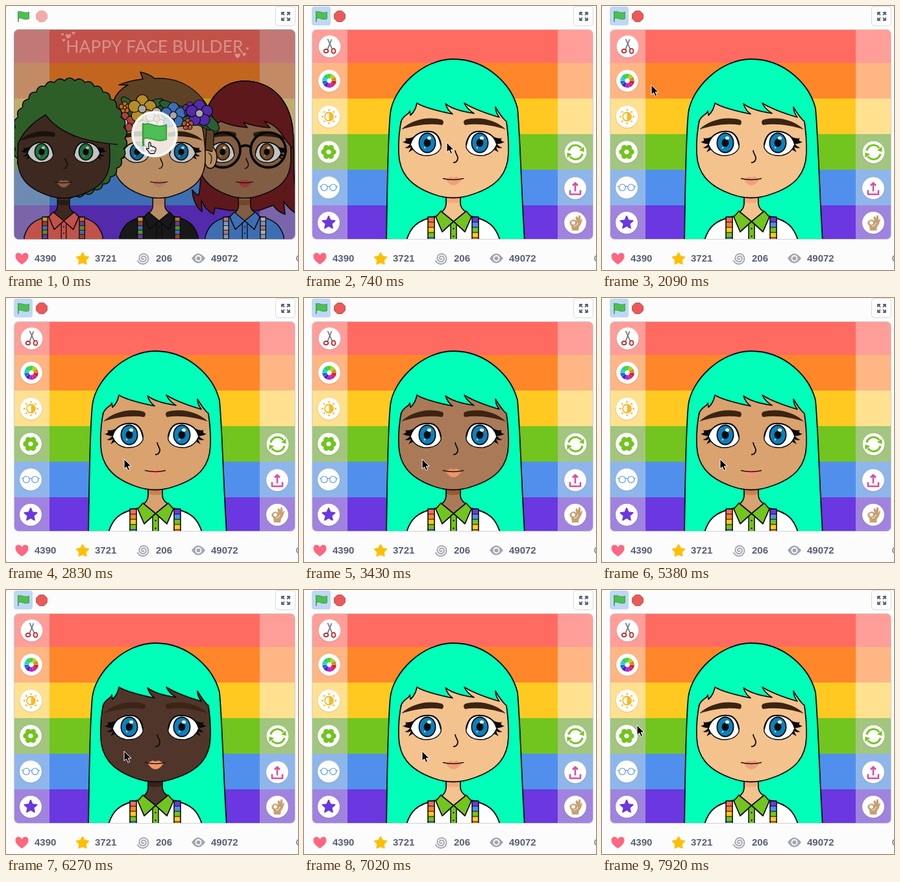
An HTML page with a canvas for the animation above (8 s loop, 450 by 408 pixels).

```html
<!DOCTYPE html>
<html lang="en">
<head>
<meta charset="utf-8">
<title>Face builder</title>
<style>
html, body { margin: 0; width: 100%; height: 100%; overflow: hidden; background: #fcfcfc; }
canvas { display: block; }
</style>
</head>
<body>
<canvas id="view" width="450" height="408"></canvas>
<script>
const ctx = document.getElementById('view').getContext('2d');
const LOOP = 8000, START = 740, TAU = Math.PI * 2;
const INK = '#0b0b0b', GREY = '#575e75', MINT = '#00ffb8';
const RED = '#ff6b60', ORANGE = '#ff8629', YELLOW = '#ffc922';
const GREEN = '#72c41f', BLUE = '#5090ec', PURPLE = '#6b37e0';
const RAINBOW = [RED, ORANGE, YELLOW, GREEN, BLUE, PURPLE];
const PALE = ['#ff9e99', '#ffb685', '#ffe190', '#a2c67d', '#8fb6ea', '#a083df'];
const EDGES = [37, 88, 143, 198, 253, 308, 361];

const SKINS = {
  tan: { skin: '#f4c28d', shade: '#f5a978', lip: '#efa07b' },
  mid: { skin: '#d9a26f', shade: '#cc8050', lip: '#ee9871' },
  brown: { skin: '#aa7a58', shade: '#9c5833', lip: '#f19468' },
  dark: { skin: '#50362a', shade: '#382118', lip: '#f0956b' },
  light: { skin: '#fadfc3', shade: '#fccda5', lip: '#e9936e' }
};
const SKIN_STEPS = [
  [0, 'tan'], [2830, 'mid'], [3430, 'brown'], [4180, 'dark'], [4630, 'light'],
  [5080, 'tan'], [5380, 'mid'], [5970, 'brown'], [6270, 'dark'], [6720, 'light'], [7020, 'tan']
];
const POINTER = [
  [590, 220, 211], [1340, 217, 198], [1490, 202, 126], [2090, 76, 122],
  [2240, 47, 108], [2390, 38, 107], [2540, 147, 191], [2680, 187, 239],
  [2830, 182, 249], [7770, 61, 176], [7920, 54, 209]
];

const stepAt = (steps, t) => steps.filter(s => s[0] <= t).pop();

function shape(d, fill, width, stroke = INK) {
  const p = typeof d === 'string' ? new Path2D(d) : d;
  if (fill) { ctx.fillStyle = fill; ctx.fill(p); }
  if (width) { ctx.lineWidth = width; ctx.strokeStyle = stroke; ctx.stroke(p); }
}
function oval(x, y, rx, ry, fill, width, stroke) {
  const p = new Path2D();
  p.ellipse(x, y, rx, ry, 0, 0, TAU);
  shape(p, fill, width, stroke);
}
const disc = (x, y, r, fill, width, stroke) => oval(x, y, r, r, fill, width, stroke);
function box(x, y, w, h, r, fill, width, stroke) {
  const p = new Path2D();
  p.roundRect(x, y, w, h, r);
  shape(p, fill, width, stroke);
}
function arc(x, y, r, a, b, width, color) {
  const p = new Path2D();
  p.arc(x, y, r, a, b);
  shape(p, null, width, color);
}
function at(x, y, s, draw) {
  ctx.save();
  ctx.translate(x, y);
  ctx.scale(s, s);
  draw();
  ctx.restore();
}
function star(x, y, r, inner, fill) {
  const p = new Path2D();
  for (let i = 0; i < 10; i++) {
    const a = i * TAU / 10 - TAU / 4, k = i % 2 ? inner : r;
    p.lineTo(x + k * Math.cos(a), y + k * Math.sin(a));
  }
  p.closePath();
  shape(p, fill, 2, fill);
}
function heart(x, y, s, fill) {
  at(x, y, s, () => shape('M0 9 C-4 6 -10 2 -10 -4 C-10 -10 -2 -11 0 -5 C2 -11 10 -10 10 -4 C10 2 4 6 0 9 Z', fill));
}
function flower(x, y, r, fill, center) {
  for (let i = 0; i < 5; i++) {
    const a = i * TAU / 5 - TAU / 4;
    disc(x + r * .58 * Math.cos(a), y + r * .58 * Math.sin(a), r * .42, fill, 1.2);
  }
  disc(x, y, r * .28, center, 1.2);
}
function flag(x, y, s) {
  at(x, y, s, () => {
    shape('M0 0 V17', null, 1.6, '#45993d');
    shape('M0 1.2 C5 -1.5 9 4.5 17 1.2 V12 C9 15 5 9 0 11.8 Z', '#4cbf56', .9, '#45993d');
  });
}

// The bust is laid out around x = 230.5; mirrored parts use this axis.
function bothSides(draw) {
  draw();
  ctx.save();
  ctx.translate(461, 0);
  ctx.scale(-1, 1);
  draw();
  ctx.restore();
}

function braces(x, colors) {
  colors.forEach((c, i) => {
    ctx.fillStyle = c;
    ctx.fillRect(x, 326 + i * 8, 10, 8);
    shape(`M${x} ${326 + i * 8} h10`, null, 1);
  });
  ctx.lineWidth = 1.6;
  ctx.strokeRect(x, 326, 10, 70);
}

function body(o) {
  shape('M158 362 C164 342 174 331 203 325 L230 333 L258 325 C286 331 296 342 302 362 V390 H158 Z', o.shirt, 1.8);
  const bands = o.bands || RAINBOW;
  braces(191, bands);
  braces(259, [...bands].reverse());
  ctx.fillStyle = o.collar;
  ctx.fillRect(226, 334, 9, 60);
  shape('M226 337 V390 M235 337 V390', null, 1.5);
  shape('M219 285 V306 Q218 315 211 319 L230 334 L251 319 Q242 314 241 306 V285 Z', o.skin, 1.8);
  shape('M220 295 H240 V303 Q230 306 220 303 Z', o.shade);
  bothSides(() => shape('M211 317 L203 326 L213 349 L230.5 333 Z', o.collar, 1.8));
  disc(230.5, 344, 1.2, INK);
  disc(230.5, 356, 1.2, INK);
}

function face(o) {
  shape('M151 172 C158 140 195 125 230 125 C268 125 303 140 311 172 C313 185 316 205 315 228 C314 257 300 278 260 291 Q230 302 200 291 C160 277 147 255 146 228 C145 205 148 185 151 172 Z', o.skin, 1.8);
  bothSides(() => {
    shape('M150 191 C163 178 188 169 213 176 Q217 179 213 184 C193 181 171 184 150 191 Z', o.brow || '#3b2412');
    shape('M172 200 Q163 206 156 204 Q160 209 152 210 Q158 214 164 213 Q160 218 155 219 Q161 221 165 218 Q163 223 161 226 L170 221 Z', INK);
    shape('M164 214 C168 198 183 191 199 195 C209 200 212 211 211 219 C206 230 196 232 184 231 C174 229 167 222 164 214 Z', '#fff', 1.4);
    oval(190, 211.5, 12.6, 15, o.iris, 1.8);
    oval(190, 211.5, 5.4, 6.2, INK);
    shape('M164 213 C168 198 183 191 199 195 Q208 199 211 215', null, 2);
  });
  for (const x of [190, 271]) {
    oval(x + 3, 204, 3, 2.6, '#fff');
    disc(x - 4, 219, 1.4, '#8ccbea');
  }
  shape('M233 223 C233 229 238 231 237 236 Q236 242 230 242', null, 1.8);
  shape('M218 267.5 L226 263.5 Q230.5 266 235 263.5 L243 267.5 Q237 277 230.5 277 Q224 277 218 267.5 Z', o.lip);
  shape('M214 266.5 Q222 268.5 230.5 268.5 Q239 268.5 246 266.5', null, 1.5, '#26120b');
}

function background() {
  RAINBOW.forEach((c, i) => {
    const y = EDGES[i], h = EDGES[i + 1] - y;
    ctx.fillStyle = PALE[i];
    ctx.fillRect(13, y, 432, h);
    ctx.fillStyle = c;
    ctx.fillRect(67, y, 324, h);
  });
}

const HAIR = 'M127 364 C128 300 129 205 133 166 C137 128 182 82 230 82 C282 82 320 122 329 158 C333 200 335 285 340 364';
const FRINGE = 'M149 180 Q151 173 158 168 Q162 166 163 162 L164 169 Q172 162 174 150 Q186 158 229 167 Q221 161 218 151 Q230 161 262 166 Q251 159 247 150 Q264 161 301 172 Q295 164 295 156 Q303 170 311 178';

function portrait(tone) {
  const look = { ...SKINS[tone], iris: '#0b80bd', shirt: '#fff', collar: GREEN };
  if (tone === 'dark') look.brow = '#3c2417';
  shape(HAIR, MINT);
  body(look);
  face(look);
  shape(FRINGE + ' L327 166 C318 122 280 84 230 84 C184 84 142 126 136 166 Z', MINT);
  shape(FRINGE, null, 1.7);
  shape(HAIR, null, 1.8);
}

function sun() {
  for (let i = 0; i < 8; i++) {
    const a = i * TAU / 8, c = Math.cos(a), s = Math.sin(a);
    shape(`M${9 * c} ${9 * s} L${11.5 * c} ${11.5 * s}`, null, 2.4, '#f8b928');
  }
  disc(0, 0, 6.5, '#fff', 1.8, '#f8b928');
  const half = new Path2D();
  half.arc(0, 0, 6.5, -TAU / 4, TAU / 4);
  shape(half, '#f8b928');
}
function wheel() {
  const n = 10;
  for (let i = 0; i < n; i++) {
    arc(0, 0, 7.3, i * TAU / n, (i + .96) * TAU / n, 7, `hsl(${360 - i * 360 / n} 72% 48%)`);
  }
}
function scissors() {
  shape('M-3 -11.5 L4 4 M3 -11 L-3 4', null, 1.8, '#74797c');
  oval(-5.5, 7, 3.3, 2.8, null, 1.9, '#c02f33');
  oval(6, 7, 2.9, 3.6, null, 1.9, '#c02f33');
}
function blossom() {
  for (let i = 0; i < 6; i++) disc(7.3 * Math.cos(i * TAU / 6), 7.3 * Math.sin(i * TAU / 6), 4.4, GREEN);
  disc(0, 0, 6, GREEN);
  disc(0, 0, 3.6, '#fff');
}
function glasses() {
  for (const x of [-6.8, 6.8]) disc(x, 0, 5, null, 1.1, BLUE);
  shape('M-2 -1 Q0 -2.5 2 -1 M-11.5 -1 L-14 -2 M11.5 -1 L14 -2', null, 1.1, BLUE);
}
function refresh() {
  for (let i = 0; i < 2; i++) {
    arc(0, 0, 11, Math.PI * 1.08, Math.PI * 1.8, 3, GREEN);
    shape('M13 -8.5 V-.5 L5.5 -3 Z', GREEN);
    ctx.rotate(Math.PI);
  }
}
function upload() {
  shape('M0 5 V-7 M-4 -4 L0 -8 L4 -4 M-8 3 V9.5 H8 V3', null, 2.6, '#da4da2');
}
function hand() {
  shape('M-5 12 L-6 5 Q-11 0 -7 -3 Q-3 -7 2 -3 Q-1 -9 2 -10 Q5 -9 5 -4 Q4 -12 7 -12 Q9 -9 8 -3 Q10 -8 11 -5 Q9 3 6 6 L5 12 Z', '#c8a173');
  disc(-3, 0, 2.7, '#fff');
  shape('M-2 5 Q3 5 4 0', null, 1, '#fff');
}
const BUTTONS = [
  [39.5, 62.5, scissors], [39, 115.5, wheel], [38.5, 171, sun], [38, 225.5, blossom],
  [38, 280.5, glasses], [38, 335, () => star(0, 0, 10, 4.6, PURPLE)],
  [418.5, 226, refresh], [418, 281.5, upload], [418, 335, hand]
];
function buttons() {
  for (const [x, y, icon] of BUTTONS) {
    disc(x, y + .5, 17.8, 'rgba(80,70,70,.15)');
    disc(x, y, 17, '#fff');
    at(x, y, 1, icon);
  }
}

function bust(x, look) {
  const place = (y, draw) => at(x, y, .84, () => {
    ctx.translate(-230.5, -211);
    draw(look);
  });
  place(229.5, body);
  place(225, face);
}

const CASUAL = ['#f6c944', '#cc5047', '#5090ec', '#77bb3b', '#8050c8', '#f08a42'];
const FADED = ['#d99a9e', '#a9c4e6', '#e6e0df', '#d99a9e', '#a9c4e6', '#e6e0df'];

function redHead() {
  const hair = '#7a1f25';
  const dome = 'C307 143 335 116 367 116 C410 116 437 146 442 190';
  shape(`M345 316 L322 312 L320 322 Q306 314 301 300 L302 318 Q288 306 287 284 Q293 292 297 292 C303 262 300 225 303 190 ${dome} C446 230 440 265 449 292 V322 Q436 314 428 302 L430 322 Q418 318 412 308 L390 316 Z`, hair, 1.6);
  bust(368, { ...SKINS.brown, lip: '#d1454a', iris: '#9a6437', shirt: BLUE, collar: BLUE, bands: FADED });
  const edge = 'M298 219 Q311 204 317 186 L331 178 Q348 186 372 188 L366 180 Q386 187 407 188 L398 178 Q418 184 428 203 Q435 212 441 220';
  shape(`${edge} L441 188 C435 145 410 117 367 117 C336 117 307 142 304 188 Z`, hair);
  shape(edge, null, 1.5);
  shape('M303 190 ' + dome, null, 1.6);
  for (const x of [334, 404]) disc(x, 222.5, 27, null, 3.8);
  shape('M361 218 Q369 213 377 218', null, 3.8);
}

function leaf(x, y, turn, size = 12) {
  ctx.save();
  ctx.translate(x, y);
  ctx.rotate(turn);
  oval(0, 0, size, size / 2, '#347b45', 1.2);
  ctx.restore();
}

function crownHead() {
  const hair = '#7b5732', skin = '#f3b982';
  shape('M163 190 C158 158 165 134 188 122 L174 122 Q191 115 211 113 L207 102 Q221 105 229 112 C276 109 310 139 321 181 L319 225 L306 230 L180 230 Z', hair, 1.6);
  oval(315, 234, 10, 17, skin, 1.6);
  shape('M312 227 Q320 231 315 244', null, 1.2);
  bust(236, { ...SKINS.tan, skin, iris: '#1683bf', shirt: '#202020', collar: '#202020', bands: CASUAL });
  shape('M170 183 C180 143 202 126 237 126 C274 126 300 146 309 192 L307 222 L319 225 L320 178 C307 137 276 112 237 113 C197 113 167 137 166 178 Z', hair);
  shape('M309 190 L307 222 L318 225', null, 1.5);
  shape('M171 181 Q195 144 238 150 Q287 151 326 187 L313 192 Q241 155 178 190 Z', '#2c7040', 1.2);
  leaf(187, 150, .8);
  leaf(232, 150, -.3);
  leaf(248, 153, .4);
  leaf(316, 181, .8, 16);
  leaf(275, 178, -.5);
  flower(183, 180, 16, '#dd554e', '#fff');
  flower(183, 157, 9, ORANGE, YELLOW);
  flower(210, 159, 22, '#edb833', '#ddd');
  flower(232, 174, 17, '#f2e8dc', YELLOW);
  flower(258, 169, 20, BLUE, '#ddd');
  flower(283, 159, 11, '#7540b9', YELLOW);
  flower(298, 166, 21, PURPLE, '#ddd');
  flower(280, 183, 9, '#e96b52', YELLOW);
}

function curlyHead() {
  const hair = '#3d7b35', p = new Path2D(), n = 34;
  for (let i = 0; i <= n; i++) {
    const a = i * TAU / n, m = a - TAU / n / 2;
    if (!i) p.moveTo(183, 204);
    else p.quadraticCurveTo(98 + 93 * Math.cos(m), 204 + 97 * Math.sin(m), 98 + 85 * Math.cos(a), 204 + 89 * Math.sin(a));
  }
  shape(p, hair, 1.6);
  bust(89, { ...SKINS.dark, lip: '#ae785c', iris: '#29924e', shirt: RED, collar: RED, bands: CASUAL, brow: '#241710' });
  const sweep = 'M18 214 C26 194 41 180 61 168 C83 199 125 210 172 214';
  shape(sweep + ' L173 160 L134 125 L65 127 L22 160 Z', hair);
  shape(sweep, null, 1.5);
}

function intro() {
  redHead();
  crownHead();
  curlyHead();
  ctx.fillStyle = 'rgba(0,0,0,.24)';
  ctx.fillRect(12, 36, 434, 326);
  const pink = '#d8908b';
  ctx.fillStyle = pink;
  ctx.font = '26.5px Lato, sans-serif';
  ctx.textAlign = 'center';
  ctx.fillText('HAPPY FACE BUILDER', 229, 71.5);
  ctx.textAlign = 'left';
  for (const [x, y, s] of [[96, 47, .42], [104, 42, .25], [87, 44, .22], [89, 53, .25], [357, 77, .42], [367, 75, .3], [372, 66, .22]]) heart(x, y, s, pink);
  disc(229, 198, 34, 'rgba(255,255,255,.78)', 3.5, '#fff');
  flag(211.5, 181, 2.1);
}

function header(running) {
  if (running) box(12, 1, 29, 29, 4, '#bdd8f5');
  flag(18.8, 8, .98);
  const p = new Path2D();
  for (let i = 0; i < 8; i++) {
    const a = (i + .5) * TAU / 8;
    p.lineTo(55 + 9 * Math.cos(a), 16 + 9 * Math.sin(a));
  }
  p.closePath();
  shape(p, running ? '#ec5959' : '#f4aaaa', 1, running ? '#b84848' : '#dfa0a0');
  box(415.5, .5, 30, 30, 4, '#fff', 1, '#d9d9d9');
  at(431, 16, 1, () => {
    for (let i = 0; i < 4; i++) {
      shape('M2 -2 L5.3 -5.3 M2 -6 H6 V-2', null, 1.8, GREY);
      ctx.rotate(TAU / 4);
    }
  });
}

function stats() {
  heart(24.5, 390.5, 1, '#ff6680');
  star(118, 391, 9.5, 5, '#ffbf00');
  const swirl = new Path2D();
  for (let i = 0; i <= 70; i++) {
    const a = i * .22, r = .7 + i * .125;
    swirl.lineTo(211.5 + r * Math.cos(a), 390 + r * Math.sin(a));
  }
  const soft = '#a3a6b2';
  shape(swirl, null, 1.9, soft);
  shape('M286 390 Q296 375 307 390 Q296 405 286 390 Z', soft);
  disc(296.5, 390, 5, '#fcfcfc');
  disc(296.5, 390, 3.1, soft);
  arc(453, 390, 5, 0, TAU, 1.6, '#777c8c');
  ctx.fillStyle = GREY;
  ctx.font = 'bold 15px "Liberation Sans", Arial, sans-serif';
  [['4390', 44], ['3721', 137], ['206', 231], ['49072', 316]].forEach(([s, x]) => ctx.fillText(s, x, 395));
}

function pointer(t) {
  if (t < 590) {
    at(216, 210, 1, () => {
      shape('M4 9 V2 Q5 -1 7 2 V7 Q9 5 10 8 Q12 6 13 9 Q15 8 15 11 Q15 15 12 18 H6 Q4 14 1 12 Q-1 9 4 11 Z', '#fff', 1.3);
      shape('M7.5 12 V15 M10 12 V15 M12.3 12 V15', null, .8);
    });
    return;
  }
  const [, x, y] = stepAt(POINTER, t);
  at(x, y, 1, () => shape('M0 0 V15 L3.5 12 L6 17.5 L8.6 16.4 L6.2 11 H11 Z', '#000', 1, '#fff'));
}

function draw(t) {
  const running = t >= START;
  ctx.fillStyle = '#fcfcfc';
  ctx.fillRect(0, 0, 450, 408);
  ctx.lineJoin = 'round';
  header(running);
  ctx.save();
  const stage = new Path2D();
  stage.roundRect(12.5, 36.5, 433, 324, 7);
  ctx.clip(stage);
  background();
  if (running) {
    portrait(stepAt(SKIN_STEPS, t)[1]);
    buttons();
  } else intro();
  ctx.restore();
  shape(stage, null, 1, running ? '#cfd0d4' : '#9e9ea1');
  stats();
  pointer(t);
}

function tick() {
  draw(performance.now() % LOOP);
  requestAnimationFrame(tick);
}
tick();
</script>
</body>
</html>
```
